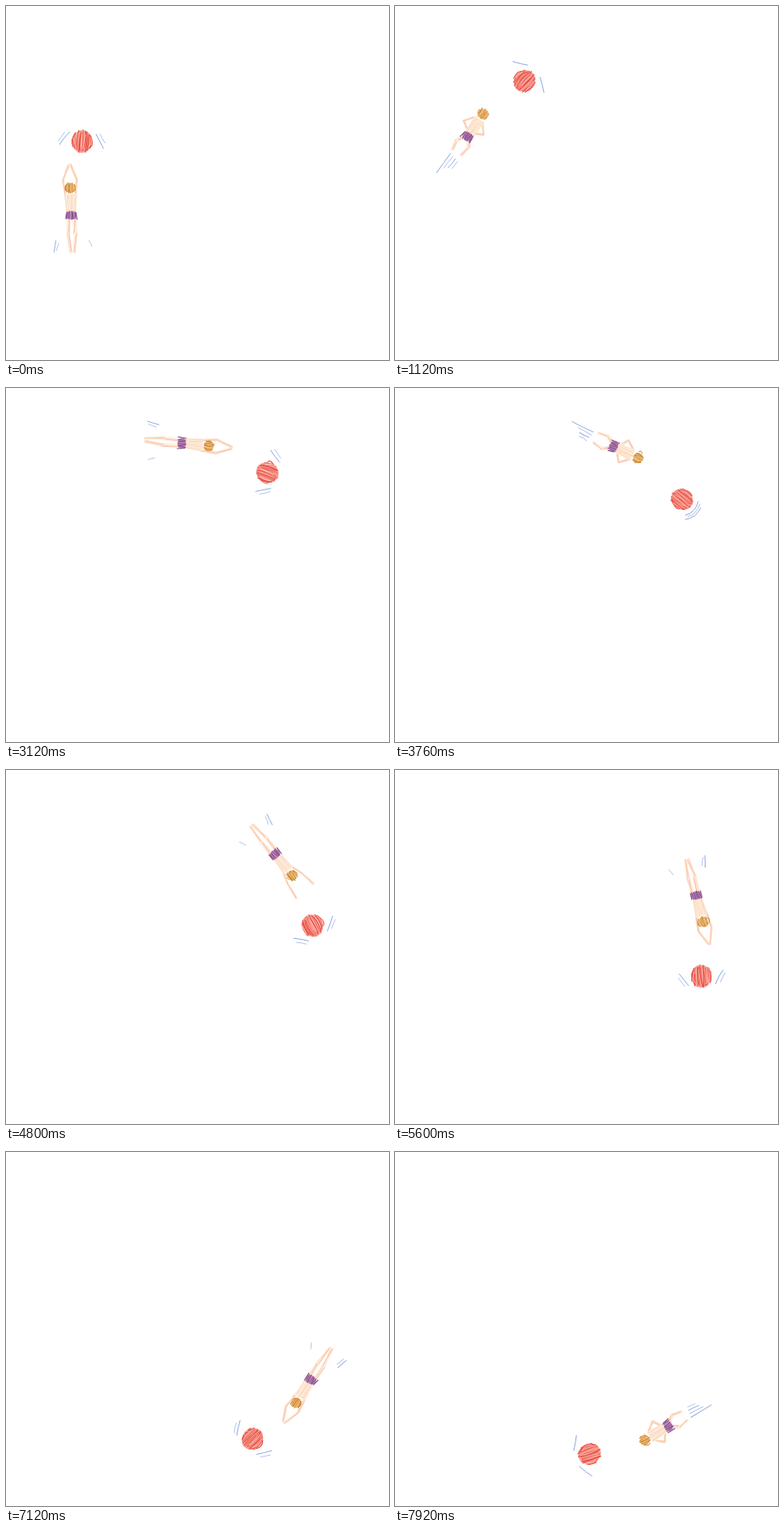
An HTML page with a canvas that plays this animation: 450x415 px, repeating every 8000 ms.

```html
<!DOCTYPE html>
<html lang="en">
<head>
<meta charset="utf-8">
<title>Swimmer and ball</title>
<style>
  html, body { margin: 0; width: 100%; height: 100%; overflow: hidden; background: #fff; }
  canvas { display: block; width: 450px; height: 415px; }
</style>
</head>
<body>
<canvas id="stage" width="450" height="415"></canvas>
<script>
const ctx = document.getElementById('stage').getContext('2d');
const LOOP = 8000, STEP = 80, STROKE = 1360, PULL = 1120;
const RAD = Math.PI / 180;

// Both travel round one circle: time, swimmer angle, ball angle
const CENTER = [221, 212], SWIM_R = 148, BALL_R = 142;
const orbit = [
  [0, 167, 202], [1120, 203.5, 241], [2400, 241.5, 285.5], [3760, 284, 325],
  [4800, 310, 348], [6400, 359, 398], [7920, 407.5, 447]
];
const SKIN = ['#f9c39c', '#f8b9ae', '#fbd3a8'];
const BLUE = ['#8fa8dc', '#b3c1ee'];

let seed = 1;
function rnd() {
  seed = (seed * 16807) % 2147483647;
  return seed / 2147483647;
}
const jit = a => (rnd() * 2 - 1) * a;
const mix = (a, b, u) => a.map((v, i) => v + (b[i] - v) * u);

// Smooth step from 0 at a to 1 at b
function ramp(v, a, b) {
  const u = Math.min(1, Math.max(0, (v - a) / (b - a)));
  return u * u * (3 - 2 * u);
}

function spline(keys, t, k) {
  let i = 0;
  while (i < keys.length - 2 && t >= keys[i + 1][0]) i++;
  const a = keys[i], b = keys[i + 1], p = keys[i - 1] || a, q = keys[i + 2] || b;
  const d = b[0] - a[0], u = (t - a[0]) / d;
  const m0 = (b[k] - p[k]) / (b[0] - p[0]) * d;
  const m1 = (q[k] - a[k]) / (q[0] - a[0]) * d;
  return a[k] + (b[k] - a[k]) * u * u * (3 - 2 * u) +
         u * (1 - u) * (m0 * (1 - u) - m1 * u);
}

function place(x, y, deg, draw) {
  ctx.save();
  ctx.translate(x, y);
  ctx.rotate(deg * RAD);
  draw();
  ctx.restore();
}

// Heading is measured from straight up, clockwise
function onCircle(r, angle, lean, draw) {
  const a = angle * RAD;
  place(CENTER[0] + r * Math.cos(a), CENTER[1] + r * Math.sin(a), angle - 180 + lean, draw);
}

function line(pts, color, width, wobble = 0) {
  ctx.strokeStyle = color;
  ctx.lineWidth = width;
  ctx.beginPath();
  for (const [x, y] of pts) ctx.lineTo(x + jit(wobble), y + jit(wobble));
  ctx.stroke();
}

const mark = (x1, y1, x2, y2, i = 0) =>
  line([[x1, y1], [(x1 + x2) / 2, (y1 + y2) / 2], [x2, y2]], BLUE[i], 0.9, 0.4);

function limb(pts, width) {
  line(pts, '#fef0e6', width);
  SKIN.forEach(c => line(pts, c, 0.7, width * 0.4));
}

function ellipse(rx, ry, color) {
  ctx.fillStyle = color;
  ctx.beginPath();
  ctx.ellipse(0, 0, rx, ry, 0, 0, Math.PI * 2);
  ctx.fill();
}

// Crayon hatching along the heading, inside an ellipse
function scribble(rx, ry, n, colors, width) {
  for (let i = 0; i < n; i++) {
    const x = rx * (-0.95 + 1.9 * (i + rnd()) / n);
    const h = ry * Math.sqrt(1 - (x / rx) ** 2);
    ctx.strokeStyle = colors[i % colors.length];
    ctx.lineWidth = width;
    ctx.beginPath();
    ctx.moveTo(x + jit(1), -h * (0.7 + rnd() * 0.3));
    ctx.quadraticCurveTo(x * 1.3 + jit(3), jit(3), x + jit(1), h * (0.7 + rnd() * 0.3));
    ctx.stroke();
  }
}

function ballMarks(phase) {
  if (phase > 0.91 && phase < 0.97) {
    for (let i = 0; i < 3; i++) {
      ctx.strokeStyle = BLUE[i % 2];
      ctx.lineWidth = 0.9;
      ctx.beginPath();
      ctx.arc(0, 0, 19 + 2.5 * i, -2.1 + 0.15 * i, -0.9 + jit(0.15));
      ctx.stroke();
    }
    return;
  }
  const ahead = phase < 0.06 ? 1 : ramp(phase, 0.5, 0.85);
  for (const s of [-1, 1]) {
    place(0, 0, s * (84 - 26 * ahead), () => {
      ctx.translate(0, -21);
      ctx.rotate(-s * 27 * RAD);
      mark(-9, 0, 9, 0);
      if (ahead < 0.8) mark(-7, -4, 5, -4, 1);
    });
  }
}

function drawBall(t, phase) {
  onCircle(BALL_R, spline(orbit, t, 2), -17, () => {
    ballMarks(phase);
    ellipse(11.8, 13.4, '#f99d92');
    scribble(12.2, 14, 14, ['#e8453c', '#f0685c', '#e2524a'], 1.1);
    scribble(11, 12, 5, ['#fdd3c8', '#fbb9a8'], 0.7);
  });
}

function waterMarks(phase, footY) {
  if (phase > 0.78 || phase < 0.06) {
    for (let i = 0; i < 4; i++) {
      const x = 4 * i - 5, y = footY + 6 + i;
      mark(x, y, x - 1, y + 28 / (1 + i * 0.6), i % 2);
    }
  } else {
    mark(-19, 29, -22, 42);
    mark(-16, 32, -19, 41, 1);
    mark(20, 30, 23, 37, 1);
  }
}

// One breaststroke cycle: pull wide, tuck in, kick and reach, glide
function pose(phase) {
  const recover = 1 - ramp(phase, 0, 0.18);
  const swing = ramp(phase, 0.62, 0.88);
  const tuck = ramp(phase, 0.88, 0.94) + recover;
  const fold = ramp(phase, 0.76, 0.96) + recover;
  const kick = 8 * Math.sin(Math.PI * Math.min(1, phase / 0.18));
  const a = swing * Math.PI / 2;
  const wide = [1 + 31 * Math.sin(a), -10 - 49 * Math.cos(a)];
  const knee = mix([4, 22], [8, 11], fold), foot = mix([1.5, 43], [6, 22], fold);
  return {
    hand: mix(wide, [6, -8], tuck),
    elbow: mix(mix([8, -41], [18, -24], swing), [14, -13], tuck),
    knee: [knee[0] + 4 * fold * (1 - fold) * 3 + kick / 3, knee[1]],
    foot: [foot[0] + kick, foot[1]]
  };
}

function drawSwimmer(t, phase) {
  const { hand, elbow, knee, foot } = pose(phase);
  onCircle(SWIM_R, spline(orbit, t, 1), 11, () => {
    waterMarks(phase, foot[1]);
    for (const s of [-1, 1]) {
      const side = ([x, y]) => [s * x, y];
      limb([[s * 3.5, 3], side(knee)], 5);
      limb([side(knee), side(foot)], 3.6);
      limb([[s * 6, -23], side(elbow), side(hand)], 3.2);
    }
    for (let i = -6; i <= 6; i += 2) {
      line([[i, -24], [i * 0.8, -4]], '#fef0e0', 2.4);
      line([[i, -24], [i * 0.8, -4]], SKIN[(i + 6) / 2 % 3], 0.6, 0.8);
    }

    ellipse(6.5, 5, '#b98abb');
    for (let i = -6; i <= 6; i += 2)
      line([[i, -4], [i * 1.1, 4.3]], i % 4 ? '#7d4886' : '#974f8c', 1.1, 0.9);

    ctx.translate(0, -32);
    ellipse(5.6, 6, '#ebbd7e');
    scribble(6.3, 6.8, 9, ['#d6903c', '#c07a30', '#e8b05c'], 1);
  });
}

function render(now) {
  const frame = Math.floor((now % LOOP) / STEP), t = frame * STEP;
  const phase = (t - PULL + STROKE) % STROKE / STROKE;
  seed = 7919 + frame * 104729;
  ctx.lineCap = ctx.lineJoin = 'round';
  ctx.clearRect(0, 0, 450, 415);
  drawBall(t, phase);
  drawSwimmer(t, phase);
}

let start;
function tick(now) {
  if (start === undefined) start = now;
  render(now - start);
  requestAnimationFrame(tick);
}
render(0);
requestAnimationFrame(tick);
</script>
</body>
</html>
```
